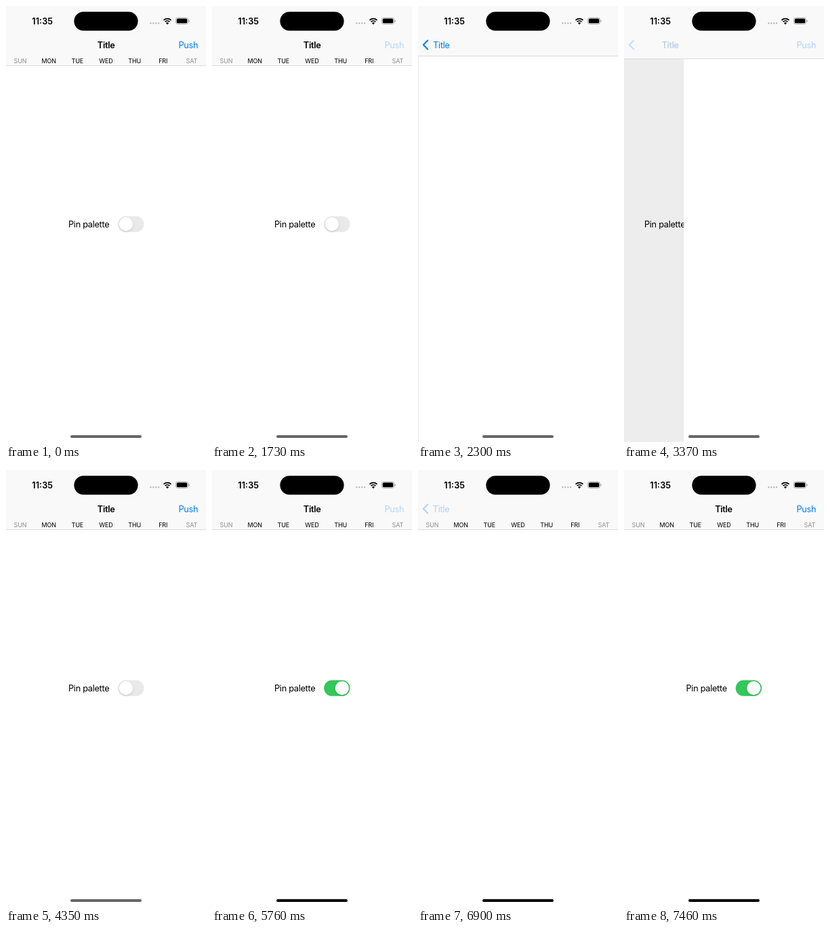
These frames come from a looping animation (295 px wide and 640 px high, 7.56 s). An HTML page:

```html
<!DOCTYPE html>
<html lang="en">
<head>
<meta charset="utf-8">
<title>Pin palette</title>
<style>
  html, body { margin: 0; height: 100%; overflow: hidden; background: #fff; }
  svg { display: block; width: 100vw; height: 100vh; }
  text { font: 12.76px Inter, Roboto, sans-serif; letter-spacing: -.3px; }
  .bold { font-weight: 600; }
  .blue { fill: #007aff; }
  #days text { font-size: 9px; letter-spacing: -.1px; text-anchor: middle; }
  #knob { filter: drop-shadow(0 1.5px 1.5px rgba(0, 0, 0, .16)); }
</style>
</head>
<body>
<svg viewBox="0 0 295 640">
  <g id="home">
    <text x="92" y="324.8">Pin palette</text>
    <rect id="track" x="165.2" y="308.5" width="38.3" height="23.3" rx="11.65"/>
    <rect id="knob" y="310" height="20.3" rx="10.15" fill="#fff"/>
  </g>
  <rect id="dim" width="295" height="640"/>
  <rect id="page" width="295" height="640" fill="#fff"/>

  <rect id="bar" width="295" fill="#f9f9f9"/>
  <rect id="line" width="295" height=".8" fill="#d4d4d4"/>
  <g id="days"></g>
  <text id="push" class="blue" x="254.4" y="61.6">Push</text>
  <text id="title" class="bold" y="61.6">Title</text>
  <text id="back" class="blue" y="61.6">Title</text>
  <path id="chevron" d="M14.3 50.5L7.9 57l6.4 6.5" fill="none" stroke="#007aff" stroke-width="2" stroke-linecap="round" stroke-linejoin="round"/>

  <text class="bold" x="53.7" y="26.7" text-anchor="middle" style="letter-spacing:0">11:35</text>
  <rect x="100.4" y="8.4" width="94.2" height="27.8" rx="13.9"/>
  <path d="M213.4 25.2h12" stroke="#bbb" stroke-width="2.5" stroke-linecap="round" stroke-dasharray="0 3.9"/>
  <path d="M232.5 20.8a7.9 7.9 0 0 1 11 0M234.6 23.2a4.9 4.9 0 0 1 6.8 0" fill="none" stroke="#000" stroke-width="1.8"/>
  <path d="M238 27.2l-2.1-2.1a3 3 0 0 1 4.2 0z"/>
  <rect x="250.4" y="17.3" width="18.2" height="9.2" rx="3" fill="none" stroke="#000" stroke-opacity=".4" stroke-width=".8"/>
  <rect x="251.7" y="18.5" width="15.6" height="6.8" rx="1.9"/>
  <path d="M269.6 20.4q1.3 .5 1.3 1.5t-1.3 1.5z" fill-opacity=".45"/>
  <rect id="indicator" x="95" y="630" width="105" height="4" rx="2"/>
</svg>
<script>
const LOOP = 7560, WIDTH = 295, PIN = 4560;
const $ = id => document.getElementById(id);
const set = (id, attrs) => {
  for (const name in attrs) $(id).setAttribute(name, attrs[name]);
};
const clamp = v => Math.max(0, Math.min(1, v));
const mix = (a, b, k) => a + (b - a) * k;

// Critically damped spring, 0 to 1
const spring = ms => {
  const x = Math.max(0, ms) * .01826;
  return 1 - (1 + x) * Math.exp(-x);
};

// The picture is refreshed only at these moments
const ticks = [0, 1730, 1860, 1980, 2090, 2200, 2300, 3140, 3250, 3370, 3480,
  3590, 3710, 4350, 4470, 4580, 4690, 4800, 4910, 5020, 5650, 5760, 5880,
  5990, 6100, 6200, 6900, 7130, 7240, 7350, 7460];

// press: finger down, start: transition begins, lag: delay of the bar
const moves = [
  { press: 0, start: -9999, push: false, lag: 0 },
  { press: 1730, start: 1859, push: true, lag: 10 },
  { press: 3140, start: 3310, push: false, lag: 0 },
  { press: 4350, start: 0, push: false, lag: 0 },
  { press: 5650, start: 5765, push: true, lag: 1 },
  { press: 6900, start: 7060, push: false, lag: 0 }
];

$('days').innerHTML = ['SUN', 'MON', 'TUE', 'WED', 'THU', 'FRI', 'SAT'].map((day, i) =>
  `<text x="${21.07 + i * 42.14}" y="83.7" fill="${i % 6 ? '#000' : '#8e8e92'}">${day}</text>`
).join('');

function drawSwitch(t) {
  const on = spring(t - PIN);
  const stretch = 5.2 * (clamp((t - 4420) / 150) - clamp((t - 4680) / 250));
  const rgb = [[233, 52], [233, 199], [234, 89]].map(([a, b]) => Math.round(mix(a, b, on)));
  set('track', { fill: `rgb(${rgb})` });
  set('knob', { x: 166.7 + on * (15 - stretch), width: 20.3 + stretch });
}

function draw(t) {
  const { start, push, lag } = moves.findLast(m => m.press <= t);
  const progress = ms => push ? spring(ms) : 1 - spring(ms);
  const p = progress(t - start), q = progress(t - start - lag);
  const pinned = t >= PIN;
  const bottom = pinned ? 87 : mix(87, 73, q);
  const titleX = mix(134.8, 21.8, q);
  const backAlpha = q * (push ? 1 : .3);

  set('home', { transform: `translate(${-.3 * WIDTH * p})` });
  set('dim', { opacity: .1 * p });
  set('page', { x: WIDTH * (1 - p) });
  set('bar', { height: bottom });
  set('line', { y: bottom });
  set('days', { opacity: pinned ? 1 : clamp(1 - 2 * q) });
  set('push', { opacity: (1 - p) * (push ? .28 : 1) });
  set('title', { x: titleX, opacity: (1 - q) ** 2 });
  set('back', { x: titleX, opacity: backAlpha });
  set('chevron', { opacity: backAlpha });
  set('indicator', { fill: t < 5650 ? '#666' : '#000' });
  drawSwitch(t);
}

function frame(now) {
  const t = now % LOOP;
  draw(ticks.findLast(tick => tick <= t));
  requestAnimationFrame(frame);
}
frame(0);
</script>
</body>
</html>
```
